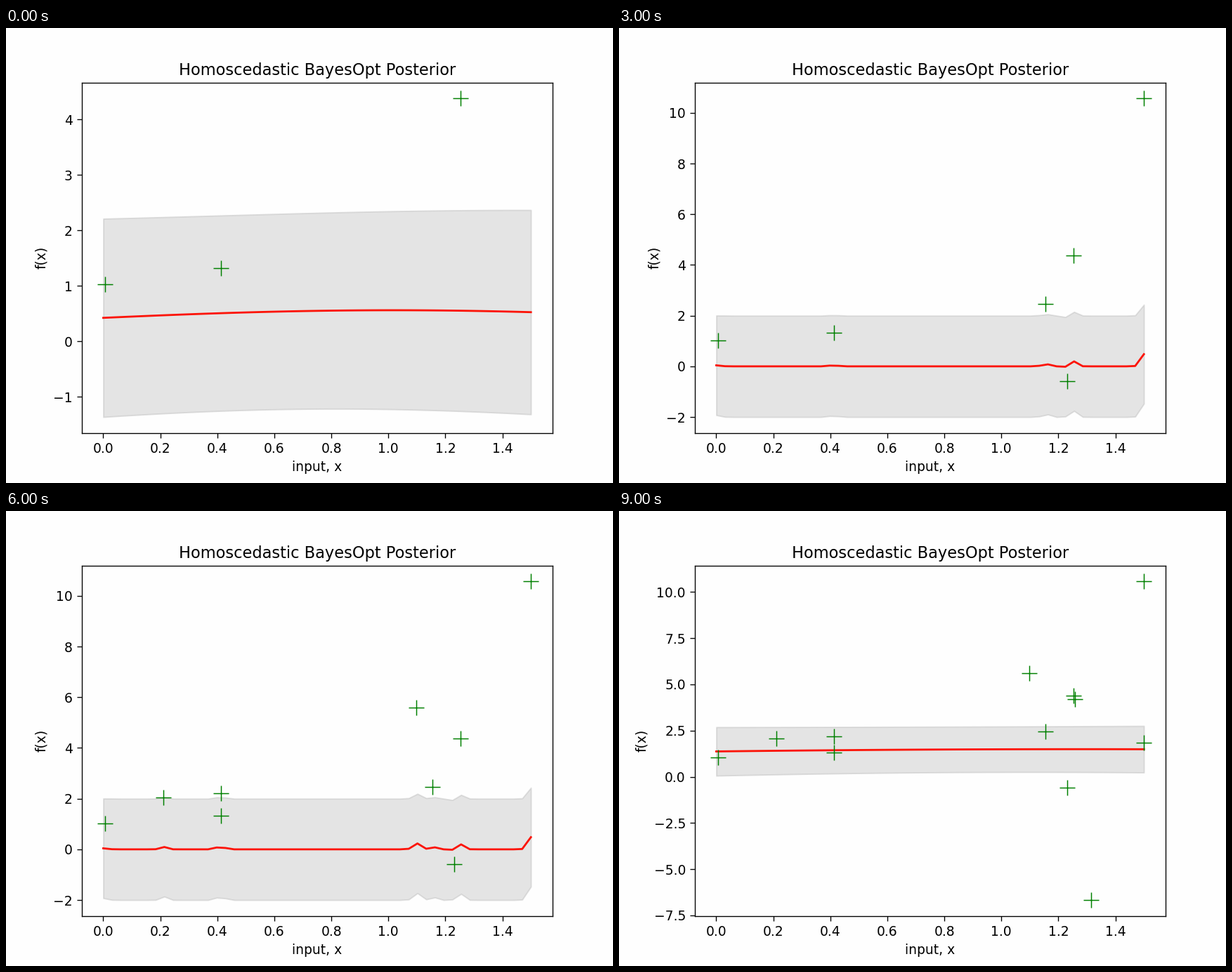
Recreate the animation shown at these times as a matplotlib script. Size 864 by 648 pixels, loop 10 s.

```python
import numpy as np
import matplotlib.pyplot as plt
from matplotlib.animation import FuncAnimation

STEPS = 10
START = 3            # samples known before the first step
GRID = np.linspace(0, 1.5, 50)

# samples (x, f(x)) in the order they are taken
SAMPLES = np.array([
    (0.0064, 1.03), (0.412, 1.324), (1.2535, 4.376),
    (1.1535, 2.462), (1.230, -0.585), (1.5, 10.567),
    (0.212, 2.055), (1.097, 5.6), (0.412, 2.2),
    (1.257, 4.195), (1.5, 1.86), (1.316, -6.67),
])

# first step: kernel length and noise variance, kept until the next entry
FITS = {0: (1.27, 8.75), 2: (4.25, 2.74), 3: (0.0115, 21),
        8: (1.85, 20.5), 9: (3.1, 7.2)}


def kernel(a, b, length):
    return np.exp(-0.5 * ((a[:, None] - b) / length) ** 2)


def posterior(step, x, y):
    """Gaussian process mean and two-sigma half width on the grid."""
    length, noise = FITS[max(s for s in FITS if s <= step)]
    cov = kernel(x, x, length) + noise * np.eye(len(x))
    cross = kernel(GRID, x, length)
    gain = np.linalg.solve(cov, cross.T).T
    return gain @ y, 2 * np.sqrt(1 - np.sum(gain * cross, axis=1))


plt.rcParams.update({
    "font.family": "DejaVu Sans",
    "axes.linewidth": 0.72,
    "xtick.major.width": 0.72,
    "ytick.major.width": 0.72,
})
fig, ax = plt.subplots(figsize=(6.4, 4.8), dpi=135, facecolor="#fefefe")


def draw(step):
    ax.clear()
    ax.set_facecolor("#fefefe")
    x, y = SAMPLES[:START + step].T
    mean, half = posterior(step, x, y)
    low, high = mean - half, mean + half

    ax.fill_between(GRID, low, high, color="gray", alpha=0.2)
    ax.plot(GRID, mean, color="#fc1408", lw=1.5)
    ax.plot(x, y, "+", color="green", ms=11.4, mew=0.79)

    bottom, top = min(low.min(), y.min()), max(high.max(), y.max())
    pad = 0.05 * (top - bottom)
    ax.set_xlim(-0.075, 1.575)
    ax.set_ylim(bottom - pad, top + pad)
    ax.set_title("Homoscedastic BayesOpt Posterior")
    ax.set_xlabel("input, x")
    ax.set_ylabel("f(x)")
    return []


anim = FuncAnimation(fig, draw, frames=STEPS, init_func=lambda: draw(0),
                     interval=1000, repeat=True, repeat_delay=0)
plt.show()
```
